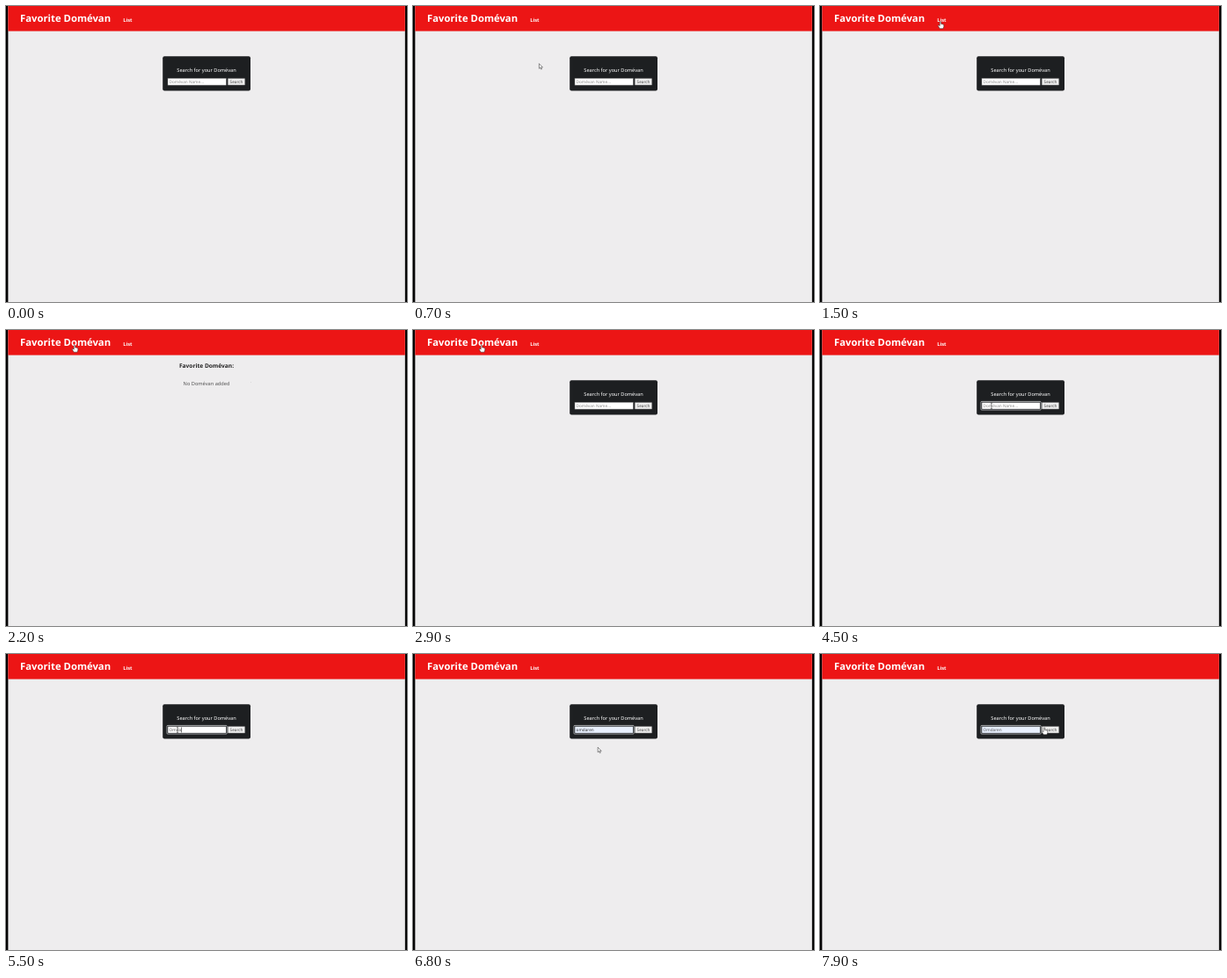
Animation of 456x337 px, one loop 8000 ms. Source, as an HTML page:

```html
<!DOCTYPE html>
<html lang="en">
<head>
<meta charset="utf-8">
<title>Favorite Domévan</title>
<style>
  html, body { margin: 0; width: 100%; height: 100%; overflow: hidden; background: #eeedee; }
  svg { display: block; width: 456px; height: 337px; }
  text { font-family: "Noto Sans", "Open Sans", sans-serif; font-size: 5.65px; text-rendering: geometricPrecision; }
  .title { font-size: 11.3px; font-weight: 700; fill: #fff; }
  .nav { font-weight: 600; fill: #fff; }
  .mid { text-anchor: middle; }
  .field { font-size: 4.7px; }
</style>
</head>
<body>
<svg viewBox="0 0 456 337">
  <rect width="456" height="337" fill="#000"/>
  <rect x="2.4" width="451.4" height="337" fill="#eeedee"/>
  <rect x="2.4" width="451.4" height="28.6" fill="#ec1515"/>
  <text class="title" x="16" y="18">Favorite Domévan</text>
  <text class="nav" x="133.3" y="17.6">List</text>

  <g id="search">
    <rect x="178.2" y="57.2" width="99.8" height="39.2" rx="2" fill="#1d1f21"/>
    <text class="mid" x="228" y="74.5" fill="#fff" font-weight="500">Search for your Domévan</text>
    <g id="ring" fill="none">
      <rect x="183" y="81.4" width="68.2" height="9.6" rx=".8" stroke="#e4e6e8" stroke-width=".7"/>
    </g>
    <rect id="box" x="184" y="82.3" width="66.3" height="7.8" fill="#fff" stroke="#777" stroke-width=".5"/>
    <text id="value" class="field" x="185.6" y="88"></text>
    <rect id="caret" y="83.4" width=".6" height="6" fill="#222"/>
    <rect x="252.3" y="82.4" width="19.4" height="7.6" rx=".5" fill="#efefef" stroke="#777" stroke-width=".5"/>
    <text class="field mid" x="262" y="88" fill="#444">Search</text>
  </g>

  <g id="list">
    <text class="mid" x="228" y="42.8" font-weight="700" fill="#222" style="font-size:6.6px">Favorite Domévan:</text>
    <text class="mid" x="228" y="62.6" fill="#555">No Domévan added</text>
  </g>

  <g id="pointer" stroke-linejoin="round">
    <path id="arrow" d="M0 0V5.6L1.3 4.5 2.2 6.5 3.1 6.1 2.2 4.2H4Z" fill="#fff" stroke="#333" stroke-width=".55"/>
    <path id="hand" d="M-.8 .6Q0 -.4 .7 .6V3.1Q1.5 2.6 1.9 3.3 2.6 2.9 3 3.6 3.8 3.4 3.8 4.3V6.1L3 8.2H-.8L-2.8 5Q-2.5 3.9-1.6 4.5L-.8 5.2Z" fill="#fff" stroke="#222" stroke-width=".5"/>
    <path id="beam" d="M-1.1-3.4Q0-3.4 0-2.8 0-3.4 1.1-3.4M0-2.8V2.8M-1.1 3.4Q0 3.4 0 2.8 0 3.4 1.1 3.4" fill="none" stroke="#333" stroke-width=".6"/>
  </g>
</svg>
<script>
const LOOP = 8000, STEP = 100;
const $ = id => document.getElementById(id);
const show = (id, on) => $(id).setAttribute("visibility", on ? "inherit" : "hidden");

// pointer moves: start, end, then the point reached
const moves = [
  [0, 100, 448, 328],
  [100, 900, 87, 17],
  [900, 1300, 141, 17],
  [1300, 1500, 137, 17.5],
  [1900, 2200, 78, 17],
  [2900, 3700, 195, 86.3],
  [6500, 6800, 210.2, 106.2],
  [6800, 7000, 212, 111.5],
  [7100, 7900, 255, 83.6]
];

// typed letters, by time
const keys = [[5000, 1], [5200, 2], [5400, 3], [5500, 4], [5700, 5], [5800, 7]];
const word = "Omdaren";

const latest = (table, t, none) => table.reduce((v, [at, x]) => t >= at ? x : v, none);
const ease = p => p * p * (3 - 2 * p);

function pointerAt(t) {
  let x = 448, y = 328;
  for (const [from, to, nx, ny] of moves) {
    if (t <= from) break;
    const p = ease(Math.min(1, (t - from) / (to - from)));
    x += (nx - x) * p;
    y += (ny - y) * p;
  }
  return [x, y];
}

function shapeAt(x, y, onSearch) {
  const inside = (l, t, r, b) => x >= l && x <= r && y >= t && y <= b;
  if (inside(16, 6, 119, 23) || inside(132, 10, 145, 20)) return "hand";
  if (onSearch && inside(252, 82, 272, 90)) return "hand";
  if (onSearch && inside(184, 82, 250, 90)) return "beam";
  return "arrow";
}

function draw(ms) {
  const t = Math.floor(ms % LOOP / STEP) * STEP;
  const onSearch = t < 1700 || t >= 2900;
  const focus = t >= 4000;
  const filled = t >= 6700;
  const preview = filled && t < 7200;
  const typed = word.slice(0, latest(keys, t, 0));

  show("search", onSearch);
  show("list", !onSearch);
  show("ring", focus);

  const value = $("value");
  value.textContent = preview ? word.toLowerCase() : typed || "Domévan Name...";
  value.setAttribute("fill", preview ? "#333" : typed ? "#555" : "#8a8a8a");
  $("box").setAttribute("fill", filled ? "#e8f0fe" : "#fff");
  $("box").setAttribute("stroke", focus ? "#1d1f21" : "#777");

  const caretOn = focus && t < 4500 || t >= 5000 && t < 6400;
  $("caret").setAttribute("x", 185.5 + (typed ? value.getComputedTextLength() : 0));
  show("caret", caretOn);

  const [x, y] = pointerAt(t);
  const shape = shapeAt(x, y, onSearch);
  $("pointer").setAttribute("transform", `translate(${x} ${y})`);
  show("pointer", t >= 100);
  for (const id of ["arrow", "hand", "beam"]) show(id, id === shape);
}

const start = performance.now();
function tick(now) {
  draw(Math.max(0, now - start));
  requestAnimationFrame(tick);
}
draw(0);
requestAnimationFrame(tick);
</script>
</body>
</html>
```
